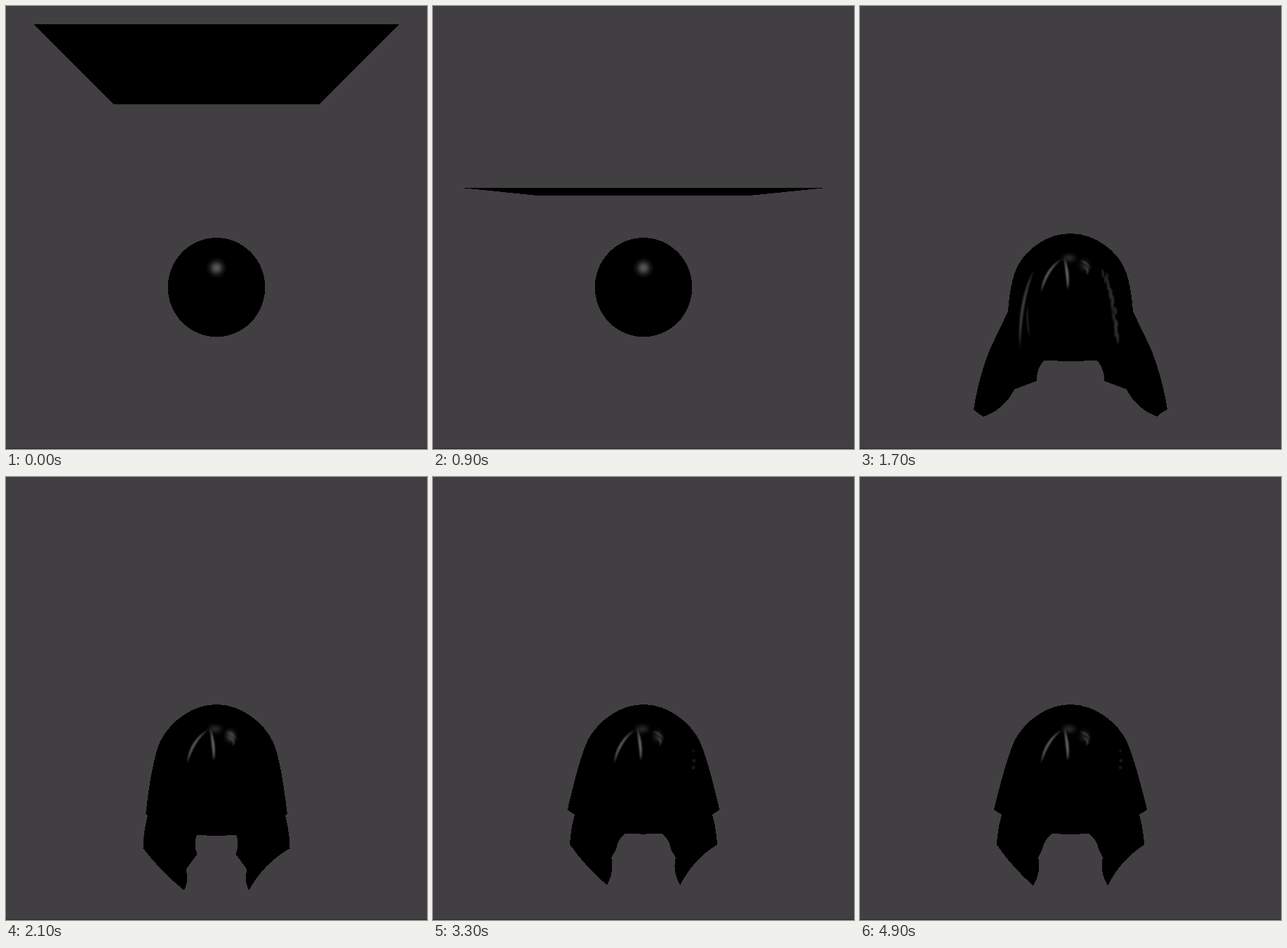
Animation, 600 px wide and 631 px high, one loop 5 s. Source, as an HTML page:

```html
<!DOCTYPE html>
<html lang="en">
<head>
<meta charset="utf-8">
<title>Cloth falling on a ball</title>
<style>
  html, body { margin: 0; width: 100%; height: 100%; overflow: hidden; background: #413f41; }
  svg { display: block; width: 100vw; height: 100vh; }
</style>
</head>
<body>
<svg viewBox="0 0 600 631" preserveAspectRatio="none">
  <defs>
    <radialGradient id="glint">
      <stop offset="0" stop-color="#5c5a5c"/>
      <stop offset=".3" stop-color="#474547"/>
      <stop offset=".65" stop-color="#181718"/>
      <stop offset="1" stop-color="#000"/>
    </radialGradient>
    <filter id="soft" filterUnits="userSpaceOnUse" x="200" y="320" width="200" height="200">
      <feGaussianBlur stdDeviation="1.2"/>
    </filter>
    <filter id="softer" filterUnits="userSpaceOnUse" x="200" y="320" width="200" height="200">
      <feGaussianBlur stdDeviation="3"/>
    </filter>
  </defs>
  <rect width="600" height="631" fill="#413f41"/>
  <rect y="630" width="600" height="1" fill="#2c2b2c"/>
  <g shape-rendering="crispEdges">
    <ellipse cx="300" cy="400.7" rx="69.3" ry="70.6"/>
  </g>
  <circle cx="300" cy="373" r="15" fill="url(#glint)"/>
  <g shape-rendering="crispEdges">
    <path id="left"/>
    <path id="right"/>
  </g>

  <g id="crown">
    <g id="streaks" filter="url(#soft)"></g>
    <ellipse cx="298" cy="359" rx="9" ry="4" fill="#333" filter="url(#softer)"/>
  </g>
  <g id="hook" filter="url(#soft)"></g>
  <ellipse id="blob" cx="320" cy="369" rx="6" ry="8" fill="#777" filter="url(#softer)"/>
  <g id="folds" filter="url(#soft)"></g>
  <g id="dots" filter="url(#soft)" fill="#2c2c2c">
    <circle cx="371" cy="390" r="1.5"/>
    <circle cx="372" cy="404" r="2"/>
    <circle cx="371" cy="414" r="2"/>
  </g>
</svg>
<script>
const LOOP = 5000, STEP = 100, MID = 300, TOP = 324;
const $ = id => document.getElementById(id);
const mix = (a, b, u) => a + (b - a) * u;
const ramp = (n, from, to) => Math.min(1, Math.max(0, (n - from) / (to - from)));
const blend = (p, q, ux, uy = ux) =>
  p.map(([x, y], i) => [mix(x, q[i][0], ux), mix(y, q[i][1], uy)]);

// Key points of half the cloth, x measured outwards from the middle:
// hem, crook, ankle, tip, outer, waist, flap, arm, shoulder.
const tent = [[60, 430], [130, 436], [190, 440], [248, 446], [250, 445],
  [190, 409], [140, 376], [110, 364], [80, 356]];
const flare = [[38, 505], [48, 534], [80, 546], [124, 585], [138, 575],
  [114, 487], [89, 435], [86, 394], [77, 374]];
const tucked = [[28, 504], [27, 528], [43, 547], [45, 572], [104, 520],
  [98, 479], [101, 477], [92, 402], [80, 376]];
const rest = [[26, 508], [40, 530], [46, 542], [53, 582], [105, 524],
  [98, 481], [109, 474], [92, 403], [80, 376]];

function poseAt(n) {
  if (n < 16) {
    const t = (n - 12) / 4;
    return blend(tent, flare, t, Math.sin(t * Math.PI / 2));
  }
  if (n < 24) {
    const t = (n - 16) / 8, sag = 18 * Math.sin(Math.PI * t);
    return blend(flare, tucked, 1 - (1 - t) ** 6)
      .map(([x, y]) => [x, y + sag * ramp(y, 400, 580) ** 2]);
  }
  const age = n - 24;
  return blend(rest, tucked, Math.exp(-age / 6) * Math.cos(age * Math.PI / 5));
}

// side is -1 for left, 1 for right; bulge bends the lower outer edge.
function half(points, side, bulge) {
  const [hem, crook, ankle, tip, outer, waist, flap, arm, shoulder] = points;
  const at = ([x, y]) => `${MID + side * x} ${y} `;
  const bow = (a, b, k) => {
    const dx = b[0] - a[0], dy = b[1] - a[1];
    return 'Q' + at([a[0] + dx / 2 - k * dy, a[1] + dy / 2 + k * dx]) + at(b);
  };
  return 'M' + at([-1, hem[1] + 1]) + 'L' + at(hem) + bow(hem, crook, -.2) + 'L' + at(ankle) +
    bow(ankle, tip, .2) + bow(tip, outer, bulge) + bow(outer, waist, .06) +
    'L' + at(flap) + 'Q' + at(arm) + at(shoulder) +
    'C' + at([67, 350]) + at([36, TOP]) + at([0, TOP]) + 'L' + at([-1, TOP]) + 'Z';
}

// The flat sheet in free fall, with air drag; the ball props up its middle.
function sheet(n) {
  const fall = -2.79 * n + 5.78 * n * n - .2239 * n ** 3;
  const near = 26 + fall, far = 139.5 + .562 * fall;
  const plane = `M40 ${near}H560L447 ${far}H153Z`;
  return n < 10 ? plane : plane + `M153 ${far}Q265 ${TOP} ${MID} ${TOP}Q335 ${TOP} 447 ${far}Z`;
}

// A tapered streak of light from a to b, bent towards c.
function lens(group, a, c, b, width, shade) {
  const [x, y] = c, w = width;
  $(group).insertAdjacentHTML('beforeend',
    `<path fill="${shade}" d="M${a}Q${x - w} ${y} ${b}Q${x + w} ${y} ${a}Z"/>`);
}
lens('streaks', [258, 408], [265, 375], [288, 360], 4, '#606060');
lens('streaks', [291, 358], [297, 382], [296, 404], 4, '#666');
lens('hook', [309, 363], [320, 360], [329, 375], 4, '#444');
lens('hook', [314, 371], [328, 370], [323, 384], 4, '#444');
lens('folds', [248, 376], [227, 420], [228, 488], 4, '#404040');
lens('folds', [239, 425], [237, 450], [242, 473], 2, '#303030');

// Crumpled fold: scattered flecks down a gentle curve.
const noise = i => Math.abs(Math.sin(i * 12.9898) * 43758.5453) % 1;
for (let i = 0; i < 22; i++) {
  const u = i / 21, x = 347 + 14 * Math.sin(u * 2.3) + 5 * (noise(i) - .5) + 8 * u ** 6;
  lens('folds', [x, 374 + 94 * u], [x + 3, 380 + 94 * u], [x + 1, 388 + 94 * u],
    2 + 2 * noise(i + 50), '#333');
}

const shines = {
  crown: n => ramp(n, 12, 15),
  hook: n => ramp(n, 12, 15) * (1 - .6 * shines.blob(n)),
  blob: n => ramp(n, 12, 15) * mix(.25, 1, Math.exp(-(((n - 24) / 4) ** 2))),
  folds: n => ramp(n, 12, 15) * (1 - ramp(n, 16, 20)),
  dots: n => ramp(n, 20, 30)
};

let shown = -1;
function draw() {
  const n = Math.max(0, Math.floor(performance.now() % LOOP / STEP) - 1);
  if (n !== shown) {
    shown = n;
    const hung = n >= 12, points = hung && poseAt(n);
    $('left').setAttribute('d', hung ? half(points, -1, .06) : sheet(n));
    $('right').setAttribute('d', hung ? half(points, 1, -.14) : '');
    for (const id in shines) $(id).setAttribute('opacity', shines[id](n));
  }
  requestAnimationFrame(draw);
}
draw();
</script>
</body>
</html>
```
